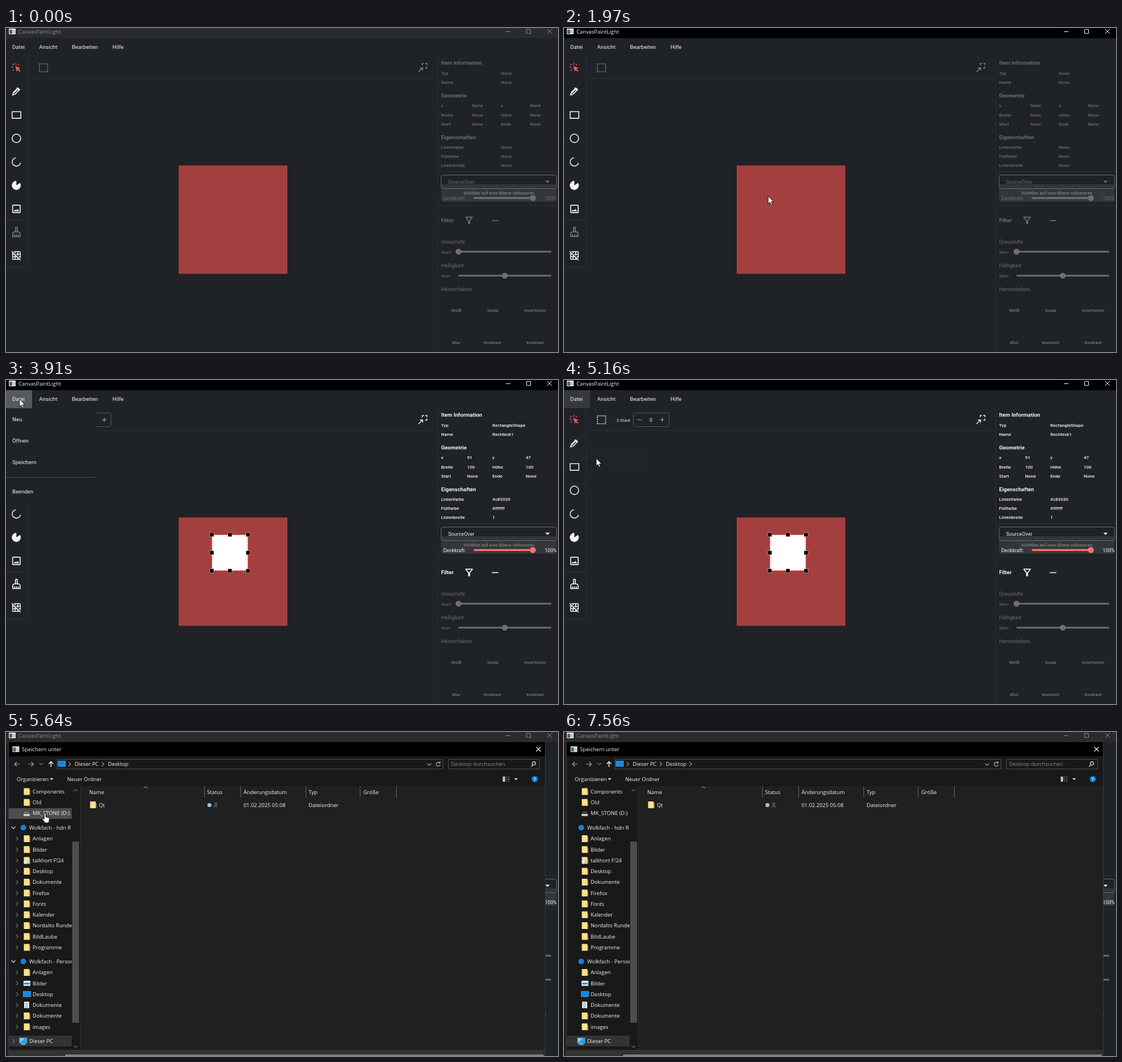
Write an HTML page that moves like this. It is 975 px wide and 574 px high and loops after 8 s.

```html
<!DOCTYPE html>
<html lang="de">
<head>
<meta charset="utf-8">
<title>CanvasPaintLight</title>
<style>
  html, body { margin: 0; width: 100%; height: 100%; overflow: hidden; background: #1f2226; }
  svg { display: block; width: 975px; height: 574px; }
  text { fill: currentColor; font-family: Roboto, sans-serif; white-space: pre; }
  .sys text { font-family: "Open Sans", sans-serif; }
  .ln { fill: none; stroke: currentColor; }
</style>
</head>
<body>
<svg id="stage" viewBox="0 0 975 574" color="#f4f4f4"></svg>
<script>
const LOOP = 8000, LINE = '#2b2e32', DIM = '#6c6e70', BG = '#1f2226';

// Text is placed by its vertical centre, with the baseline on a whole pixel
const text = (x, cy, s, size = 9.6, extra = '') =>
  `<text x="${x}" y="${Math.round(cy + size * 0.36)}" font-size="${size}" ${extra}>${s}</text>`;
const bold = (x, cy, s, size = 9.6, extra = '') => text(x, cy, s, size, 'font-weight="700" ' + extra);
const rect = (x, y, w, h, fill, extra = '') =>
  `<rect x="${x}" y="${y}" width="${w}" height="${h}" fill="${fill}" ${extra}/>`;
const line = (d, w = 1, extra = '') => `<path class="ln" d="${d}" stroke-width="${w}" ${extra}/>`;
const shape = (d, fill = 'currentColor', extra = '') => `<path d="${d}" fill="${fill}" ${extra}/>`;
const dot = (x, y, r, fill = 'currentColor', extra = '') =>
  `<circle cx="${x}" cy="${y}" r="${r}" fill="${fill}" ${extra}/>`;
const group = (id, body, extra = '') => `<g id="${id}" ${extra}>${body}</g>`;
const icon = (x, y, k, d) => shape(d, 'currentColor', `transform="translate(${x - 12 * k} ${y - 12 * k}) scale(${k})"`);
const rule = (d, color = LINE) => line(d, 1, `style="stroke:${color}"`);
const down = (x, y, w = 4) => shape(`M${x - w} ${y - w / 2}h${2 * w}l${-w} ${w}z`);
const appIcon = (x, y) => rect(x, y, 12, 10, '#e8e8e8') + rect(x + 1, y + 2, 5, 7, '#3d6f5e') + rect(x + 7, y + 3, 4, 5, '#b9c3c9');

function titleBar() {
  return '<rect id="titleBg" width="975" height="18"/>' + group('titleFg',
    appIcon(5, 1) + text(22, 6.5, 'CanvasPaintLight', 9.4) +
    line('M883 6.5h8M919.5 2.5h7v7h-7zM956 2l8 8M964 2l-8 8'), 'class="sys"');
}

function menuBar() {
  return rect(0, 18, 46, 32, '#fff', 'id="fileBg"') +
    [[11, 'Datei'], [58.5, 'Ansicht'], [116.5, 'Bearbeiten'], [188, 'Hilfe']].map(([x, s]) => text(x, 34, s)).join('');
}

function tools() {
  return rect(3, 138, 31, 32, '#57595c', 'rx="4" id="press"') +
    group('pick', shape('M16.5 67.5l9 3.5-3.5 1.5 3.5 3.5-1.5 1.5-3.5-3.5-1.5 3.5z') +
      line('M11.5 63.5l2.2 2.2M17.5 62v3.2M10 69.5h3.2M12 75.5l2-2M23 64l-2 2', 1.4)) +
    line('M11.8 118.5l1.2-4.2 8-8 3 3-8 8zM14 115l7.5-7.5M18.5 106l5 5', 1.7) +
    line('M10.8 148.3h15.4v11.6h-15.4z', 1.6) +
    dot(18.4, 195.5, 7.5, 'none', 'stroke="currentColor" stroke-width="1.6"') +
    line('M17.5 229.7A7.5 7.5 0 1 0 25.7 239', 1.6) +
    shape('M18.3 278.8V270.8A8 8 0 1 0 24.8 274.3z') +
    icon(18.4, 320.5, .83, 'M19 5v14H5V5h14m0-2H5c-1.1 0-2 .9-2 2v14c0 1.1.9 2 2 2h14c1.1 0 2-.9 2-2V5c0-1.1-.9-2-2-2zm-4.86 8.86l-3 3.87L9 13.14 6 17h12l-3.86-5.14z') +
    group('broom', icon(18.4, 361.3, .82, 'M16 11h-1V3c0-1.1-.9-2-2-2h-2c-1.1 0-2 .9-2 2v8H8c-2.76 0-5 2.24-5 5v7h18v-7c0-2.76-2.24-5-5-5zm-5-8h2v8h-2V3zm8 18h-2v-3c0-.55-.45-1-1-1s-1 .45-1 1v3h-2v-3c0-.55-.45-1-1-1s-1 .45-1 1v3H9v-3c0-.55-.45-1-1-1s-1 .45-1 1v3H5v-5c0-1.65 1.35-3 3-3h8c1.65 0 3 1.35 3 3v5z')) +
    icon(18.4, 403, .75, 'M8 4v1.45l2 2V4h4v4h-3.45l2 2H14v1.45l2 2V10h4v4h-3.45l2 2H20v1.45l2 2V4c0-1.1-.9-2-2-2H4.55l2 2H8zm8 0h4v4h-4V4zM1.27 1.27L0 2.55l2 2V20c0 1.1.9 2 2 2h15.46l2 2 1.27-1.27L1.27 1.27zM10 12.55L11.45 14H10v-1.45zm-6-6L5.45 8H4V6.55zM8 20H4v-4h4v4zm0-6H4v-4h3.45l.55.55V14zm6 6h-4v-4h3.45l.55.54V20zm2 0v-1.46L17.46 20H16z') +
    rule('M39.5 50V423.5H0M0 340.5H39M40 89.5H762M762.5 50V574M763 254.5H975M763 314.5H975');
}

const viewIcons = group('viewIcons',
  line('M59 63.5h14.5v14H59z', 1.6, 'stroke-dasharray="2 1.56"') +
  line('M728.5 78l7-7M731 70.8h4.8v4.8', 1.4) +
  line('M735 62.8h3M740.5 62.8h3v3M743.5 68.5v3M735.3 62.5v3.5M740.5 71.3h3', 1.4));

function canvas() {
  let box = rect(363.5, 274, 64, 64, '#fff', 'stroke="#e02b20" stroke-width="1.5" stroke-dasharray="2.5 1.5"');
  for (let i = 0; i < 9; i++) if (i !== 4)
    box += rect(360 + i % 3 * 32, 270.5 + (i / 3 | 0) * 32, 7, 7, '#000', 'stroke="#ddd" stroke-width=".5"');
  const stepper = text(93, 71, 'Z-Stack', 7.2) +
    rect(122.5, 58.5, 63, 24, 'none', 'rx="3" stroke="#55585c"') +
    line('M129.5 70.5h8M169.5 70.5h8M173.5 66.5v8', 1, 'opacity=".65"') + text(153.5, 70.5, '0', 8.4, 'text-anchor="middle"');
  return rect(305, 243.5, 192, 192, '#a33f3f') + group('shape', box + stepper);
}

// Upper part of the inspector, either empty or for the selected shape
function inspector(on) {
  const [c1, c2, c3] = on ? [814.5, 859, 918] : [823.5, 874, 925.5];
  const val = v => on ? v : 'None';
  const small = (x, y, s) => text(x, y, s, 8, 'font-weight="500"');
  let out = bold(768.5, 62, 'Item Information') + bold(768.5, 119.5, 'Geometrie') + bold(768.5, 193.5, 'Eigenschaften');
  [[80, 'Typ', 'RectangleShape'], [96.5, 'Name', 'Rechteck1'], [211.5, 'Linienfarbe', '#c83030'],
   [227.5, 'Füllfarbe', '#ffffff'], [243.5, 'Linienbreite', '1']]
    .forEach(([y, k, v]) => out += small(768.5, y, k) + small(c2, y, val(v)));
  [[137.5, 'x', '91', 'y', '47'], [154, 'Breite', '100', 'Höhe', '100'], [170, 'Start', 'None', 'Ende', 'None']]
    .forEach(([y, a, v, b, w]) => out += small(768.5, y, a) + small(c1, y, val(v)) + small(c2, y, b) + small(c3, y, val(w)));
  const accent = on ? '#ff6f6b' : DIM;
  return out + text(781, 272.5, 'SourceOver', 9) + down(956.5, 272.5) +
    text(772.5, 301.5, 'Deckkraft:', 8.8) + rect(826, 299.5, 106, 3.6, accent, 'rx="1.8"') + dot(930.5, 301.3, 5.4, accent) +
    text(951.5, 301.5, '100%', 8.8) + bold(768.5, 341, 'Filter') +
    icon(818, 341, .84, 'M7 6h10l-5.01 6.3L7 6zm-2.75-.39C6.27 8.2 10 13 10 13v6c0 .55.45 1 1 1h2c.55 0 1-.45 1-1v-6s3.72-4.8 5.74-7.39c.51-.66.04-1.61-.79-1.61H5.04c-.83 0-1.3.95-.79 1.61z') +
    line('M858 341.3h11.5', 1.6);
}

function filters() {
  const slider = (y, name, x) => text(768.5, y - 18, name) + text(768.5, y + .5, 'Wert', 8) +
    rect(799, y - 1.5, 164, 3, DIM, 'rx="1.5"') + dot(x, y, 5.3);
  return slider(396.3, 'Graustufe', 799.3) + slider(438.7, 'Helligkeit', 881) + text(768.5, 463, 'Hervorheben') +
    [[795.5, 500, 'Weiß'], [859.5, 500, 'Sepia'], [934.5, 500, 'Invertieren'],
     [795.5, 557.5, 'Blur'], [859.5, 557.5, 'Kontrast'], [934.5, 557.5, 'Kontrast']]
      .map(([x, y, s]) => bold(x, y, s, 8, 'text-anchor="middle"')).join('');
}

const panel =
  rect(768.5, 277, 204, 31, '#33363a', 'rx="4"') +
  rect(768.5, 260.5, 204, 24, 'none', 'rx="3" stroke="#686b6e"') +
  bold(870.5, 292.5, 'Sichtbar auf eine Ebene reduzieren', 8, 'text-anchor="middle" style="fill:#77797b"') +
  group('off', inspector(false), `color="${DIM}"`) + group('on', inspector(true)) +
  `<g color="${DIM}">${filters()}</g>`;

const menu = group('menu',
  rect(0, 50, 158, 167, BG, 'stroke="#1a1c20"') + rect(0, 127, 158, 38, '#35383c', 'id="saveRow"') +
  rule('M0 172.5H158', '#44474b') +
  [[69.5, 'Neu'], [107.5, 'Öffnen'], [146, 'Speichern'], [198, 'Beenden']].map(([y, s]) => text(11, y, s)).join(''));

const folder = (x, y) => rect(x, y - 6, 10, 12, '#ffe08c') + shape(`M${x + 10} ${y + 6}v-9h1v9z`, '#e9bd4f');
const screen = (x, y, fill = '#0d8be6') => rect(x, y - 5, 13, 9.5, fill, 'stroke="#6cc0f5" stroke-width=".6"');
const chev = (x, y) => line(`M${x - 1.8} ${y - 3.5}l3.6 3.5-3.6 3.5`);
const vee = (x, y, k = 1, w = 1) => line(`M${x - 3.5} ${y - 1.8 * k}l3.5 ${3.6 * k} 3.5 ${-3.6 * k}`, w);

const navIcons = {
  folder: y => folder(31.5, y),
  drive: y => rect(31, y + 1, 11, 4, '#c9c9c9', 'rx="1"') + line(`M32 ${y}l2-2h5l2 2`, 1, 'opacity=".6"'),
  picture: y => rect(31, y - 4.5, 12, 9, '#f1f1f1') + rect(32, y - 1, 10, 3, '#2f86c9'),
  desktop: y => screen(30.5, y),
  paper: y => rect(32, y - 6, 9, 11.5, '#e8edf1') + rule(`M34 ${y - 3}h5M34 ${y}h5M34 ${y + 3}h5`, '#6a8ba5'),
  shared: y => folder(31.5, y) + dot(34.5, y + 3, 3, '#e9eef2') + dot(39, y + 3, 2.6, '#b5cfe0')
};

function navPane() {
  const STEP = 19.25, SIZE = 9.4;
  let rows = '', arrows = '';
  const list = (top, names, open) => names.forEach((entry, i) => {
    const y = top + i * STEP;
    const [name, kind = 'folder'] = entry.split('|');
    rows += navIcons[kind](y) + text(47, y, name, SIZE);
    if (open) arrows += chev(19.5, y);
  });
  const root = (y, name) => {
    rows += dot(30.5, y, 5, '#1683d8') + text(41, y, name, SIZE);
    arrows += `<g color="#e4e4e4">${vee(13, y, 1, 1.2)}</g>`;
  };
  list(105.5, ['Components', 'Old', 'MK_STONE (D:)|drive']);
  root(169.5, 'Wolkfach - hdn R');
  list(189, ['Anlagen', 'Bilder', 'talkhort F!24|shared', 'Desktop', 'Dokumente', 'Firefox', 'Fonts', 'Kalender',
    'Nordalto Runden', 'BildLaube', 'Programme'], true);
  root(406.5, 'Wolkfach - Person');
  list(426, ['Anlagen', 'Bilder|picture', 'Desktop|desktop', 'Dokumente|paper', 'Dokumente', 'images'], true);
  rows += screen(24, 547, '#2f9fe6') + shape('M24.5 551v-8.5h8z', '#8fd0f6') +
    rect(26.5, 552.5, 8, 1.5, '#b5d9ee') + text(41, 547.5, 'Dieser PC', SIZE);
  arrows += chev(13, 547.5);
  return rect(5, 96, 126, 467, '#191919') + rect(5, 538, 111, 19, '#333') + rect(5, 135, 111, 19, '#4d4d4d', 'id="driveRow"') +
    `<g clip-path="url(#nav)">${rows}</g>` + group('arrows', arrows, 'color="#aaa"') +
    rect(117, 194, 12, 321, '#4d4d4d') + `<g color="#9a9a9a">${vee(123, 103.5, -1) + vee(123, 557.5)}</g>` +
    rule('M131.5 96V563', '#303030');
}

function dialog() {
  const t = (x, y, s, extra) => text(x, y, s, 9.4, extra);
  const field = (x, w) => rect(x + .5, 48.5, w, 17, '#191919', 'stroke="#505050"');
  const top = rect(4, 18, 949, 556, '#191919') + rect(4, 18, 949, 25, '#000') + appIcon(11.5, 25.5) + t(28, 31, 'Speichern unter') +
    line('M936.5 26.5l8 8M944.5 26.5l-8 8', 1.1) +
    line('M24.5 57h-9M19 53l-4 4 4 4M39 57h9M44.5 53l4 4-4 4', 1.1, 'opacity=".65"') +
    `<g opacity=".7">${vee(62.5, 56.5, .7)}</g>` + line('M79.5 62v-9.5M75.5 56.5l4-4 4 4', 1.5) +
    field(90, 681) + field(781, 161) + screen(92, 56.5) + chev(112.5, 57) + t(121.5, 57, 'Dieser PC') + chev(171, 57) +
    t(180, 57, 'Desktop') + group('crumb', chev(223.5, 57)) + vee(747.5, 57.5) +
    line('M766 54.5A3.6 3.6 0 1 0 767 58M766.8 52v3h-3', 1.1, 'opacity=".75"') +
    t(786, 57, 'Desktop durchsuchen', 'style="fill:#8c8c8c"') +
    line('M927.5 61.5l3.5-3.5M930.6 57.8a2.9 2.9 0 1 1 4.1-.2 2.9 2.9 0 0 1-4.1.2', 1.1) +
    t(19, 83.5, 'Organisieren') + down(80.5, 83.5, 3.2) + t(108, 83.5, 'Neuer Ordner') +
    rect(877.5, 79, 4, 9, '#cfcfcf') + line('M883 80h2M883 83.5h2M883 87h2M886.5 80h3M886.5 83.5h3M886.5 87h3', 1, 'opacity=".6"') +
    down(901, 83.5, 3.2) + dot(934, 83.3, 5.6, '#0b7bd6') + bold(934, 83.5, '?', 9, 'text-anchor="middle"');
  const files = rect(132, 96, 821, 467, '#202020') +
    rule('M350.5 96v20M414.5 96v20M529.5 96v20M625.5 96v20M689.5 96v20', '#636363') +
    `<g opacity=".7">${vee(246.5, 98, -.8)}</g>` +
    [[147, 'Name'], [355, 'Status'], [419.5, 'Änderungsdatum'], [534.5, 'Typ'], [631, 'Größe']].map(([x, s]) => t(x, 106.5, s)).join('') +
    folder(148.5, 129) + t(164, 129.5, 'Qt') + dot(359.3, 129.5, 3.6, '#8cc8f0') +
    line('M367.5 133.5q3-5 6 0M370.5 129.5a2 2 0 1 1 .1 0', 1, 'opacity=".6"') +
    t(419.5, 129.5, '01.02.2025 05:08') + t(534.5, 129.5, 'Dateiordner');
  const foot = rect(4, 563, 949, 11, '#333') + rect(105, 572, 844, 2, '#191919') + line('M105.5 574v-1.5h843v1.5');
  return group('dialog', top + files + navPane() + foot + rule('M4.5 18V574M952.5 18V574', '#3a3a3a'), 'class="sys"');
}

const outline = 'stroke="#000" stroke-width=".8"';
const pointer = dot(1, 0, 9.3, '#c9b92a', 'id="halo"') +
  shape('M0 0v13.2l3-2.8 2.2 4.9 2.2-1-2.2-4.6h4.3z', '#fff', 'id="arrow" ' + outline) +
  shape('M-2.5 7.5V-1.5q0-1.5 1.3-1.5t1.3 1.5V3.5l4.5 1q2.2.5 2 2.5l-.6 4q-.3 1.5-1.2 3H-1q-1-2-2.5-3.5l-2.5-3q-.5-1.5.8-1.5z', '#fff', 'id="hand" ' + outline);

document.getElementById('stage').innerHTML =
  '<defs><clipPath id="nav"><rect x="5" y="96" width="111" height="467"/></clipPath></defs>' +
  rect(0, 0, 975, 574, BG) + tools() + viewIcons + canvas() + panel + titleBar() + menu + menuBar() + dialog() + group('cursor', pointer);

const el = {};
document.querySelectorAll('[id]').forEach(e => el[e.id] = e);

const clamp = v => Math.max(0, Math.min(1, v));
const part = (t, from, ms) => clamp((t - from) / ms);
const within = (t, ...spans) => spans.some(([a, b]) => t >= a && t < b);
const show = (id, on) => el[id].style.display = on ? '' : 'none';
const fade = (id, v) => el[id].style.opacity = v;
const tint = (id, color) => el[id].setAttribute('color', color);

// time, x, y of the pointer
const track = [[260, 640, 418], [400, 62, 201], [860, 62, 201], [1070, 10, 161], [1250, 10, 161], [1620, 50, 214],
  [2080, 412, 312], [2460, 412, 312], [2740, 170, 101], [2940, 170, 101], [3130, 210, 148], [3500, 24, 34], [4200, 24, 34],
  [4750, 57, 139], [5200, 57, 139], [5600, 70, 147], [5750, 70, 147], [6180, 205, 160], [6600, 191, 560], [7020, 191, 560], [7500, 191, 576]];

function pointerAt(t) {
  const i = track.findIndex(k => k[0] > t);
  if (i < 1) return track[i < 0 ? track.length - 1 : 0].slice(1);
  const [t0, x0, y0] = track[i - 1], [t1, x1, y1] = track[i];
  const p = (t - t0) / (t1 - t0), e = p * p * (3 - 2 * p);
  return [x0 + (x1 - x0) * e, y0 + (y1 - y0) * e];
}

const OPEN = 3640, CLOSE = 5065, DIALOG = 5300, PLACED = 2250;

function pose(t) {
  const active = within(t, [1070, DIALOG]), placed = t >= PLACED;
  el.titleBg.setAttribute('fill', active ? '#000' : '#2b2b2b');
  tint('titleFg', active ? '#f4f4f4' : '#8f8f8f');

  show('press', within(t, [1070, 1330]));
  tint('pick', within(t, [PLACED, 3300]) ? '#a04f4c' : '#f0615a');
  tint('broom', placed ? '#f4f4f4' : '#7d7f81');
  tint('viewIcons', placed ? '#f4f4f4' : '#85878a');
  show('shape', placed);
  show('on', placed);
  show('off', !placed);

  fade('fileBg', within(t, [3450, 4450]) ? .25 : within(t, [3350, 3450], [4450, DIALOG]) ? .1 : 0);
  const closing = t >= CLOSE, start = closing ? CLOSE : OPEN;
  const grow = Math.pow(1 - part(t, start, 220), 5);
  const blend = Math.pow(1 - part(t, start, 150), 3);
  const scale = closing ? .9 + .1 * grow : 1 - .1 * grow;
  fade('menu', closing ? blend : 1 - blend);
  el.menu.setAttribute('transform', `translate(0 ${50 - 50 * scale}) scale(${scale})`);
  const [x, y] = pointerAt(t);
  show('saveRow', t > 4200 && y > 127);

  show('dialog', t >= DIALOG);
  show('crumb', t >= 5900);
  show('driveRow', within(t, [5400, 5900]));
  fade('arrows', Math.min(part(t, 5400, 200), 1 - part(t, 6260, 760)));

  show('cursor', within(t, [260, 7500]));
  el.cursor.setAttribute('transform', `translate(${x.toFixed(2)} ${y.toFixed(2)})`);
  const hand = within(t, [5550, 5850]);
  show('hand', hand);
  show('arrow', !hand);
  show('halo', within(t, [1070, 1220], [2090, 2250], [3560, 3700], [4900, 5050]));
}

function tick(now) {
  pose(now % LOOP);
  requestAnimationFrame(tick);
}
pose(0);
requestAnimationFrame(tick);
</script>
</body>
</html>
```
